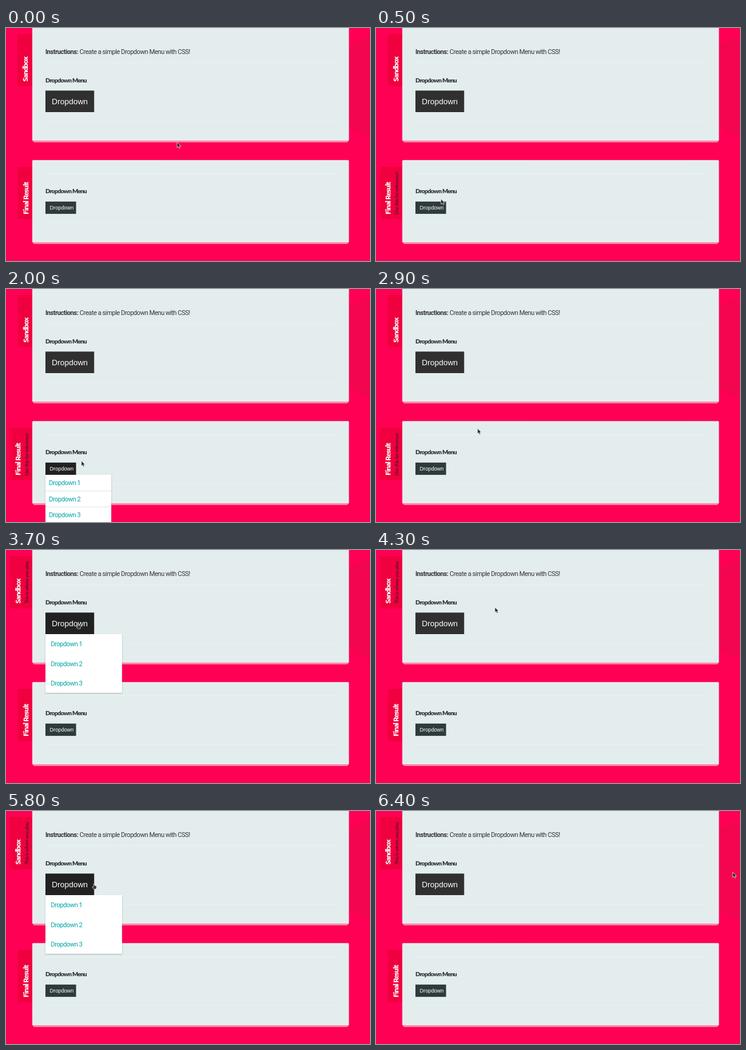
These frames come from a looping animation (600x385 px, 6.5 s). An HTML page:

```html
<!DOCTYPE html>
<html lang="en">
<head>
<meta charset="utf-8">
<title>Dropdown Menu</title>
<style>
  html, body { margin: 0; height: 100%; overflow: hidden; background: #ff0055; }
  svg { display: block; width: 600px; height: 385px; }
  .body { font: 10.6px Roboto, sans-serif; letter-spacing: -.48px; fill: #333; }
  .strong { font-weight: 700; }
  .link { fill: #00a5a8; }
  .head { font: 900 10.2px Lato, sans-serif; letter-spacing: -.8px; fill: #2f3335; }
  .title { font: 900 11.8px Lato, sans-serif; letter-spacing: -.7px; fill: #fff; }
  .note { font: 700 8px Lato, sans-serif; letter-spacing: -.38px; fill: #5a1232; }
  .label { font-family: "Liberation Sans", Arial, sans-serif; fill: #fff; }
  .menu { filter: drop-shadow(0 1px 1px rgba(0, 0, 0, .25)); }
</style>
</head>
<body>
<svg id="stage" viewBox="0 0 600 385"></svg>
<script>
const LOOP = 6500, STEP = 100, SLIDE = 13;

const text = (cls, x, y, str, extra = '') =>
  `<text class="${cls}" x="${x}" y="${y}" ${extra}>${str}</text>`;
const rect = (x, y, w, h, fill, extra = '') =>
  `<rect x="${x}" y="${y}" width="${w}" height="${h}" fill="${fill}" ${extra}/>`;

const tab = (id, y, title, note) => `<g id="${id}">
  ${rect(19.3, y, 50, 86.5, '#f0003e', 'rx="2"')}
  <g transform="translate(36.8 ${y + 78.5}) rotate(-90)">
    ${text('title', 0, 0, title)}${text('note', 0, SLIDE, note)}
  </g></g>`;

const panel = (y, bottom) => `
  <path d="M43.3 ${bottom - 1}h522v1l-3 3h-516l-3 -3z" fill="#f987a8"/>
  ${rect(43.3, y, 522, bottom - y, '#e4edee', 'rx="1.5"')}`;

const rule = y => rect(65, y, 480, 1, '#ebf1f1');

const button = b => rect(b.x, b.y, b.w, b.h, b.color, `id="${b.id}"`) +
  text('label', b.x + b.size * .81, b.y + b.h / 2 + b.size * .35, 'Dropdown', `font-size="${b.size}"`);

const menu = m => {
  const top = m.y + m.h;
  const item = i => (m.lines && i ? rect(m.x, top + i * m.row, m.menuW, 1, '#dde5e6') : '') +
    text('body link', m.x + m.indent, top + m.first + i * m.row, `Dropdown ${i + 1}`);
  return `<g id="${m.id}Menu" class="menu">
    ${rect(m.x, top, m.menuW, 3 * m.row, '#fff')}${[0, 1, 2].map(item).join('')}</g>`;
};

const buttons = [
  { id: 'big', x: 65, y: 103.4, w: 80.3, h: 35.6, size: 13, color: '#303030',
    menuW: 126.3, row: 32.3, indent: 8.8, first: 20.4 },
  { id: 'small', x: 65, y: 286.8, w: 50.5, h: 20.3, size: 8.7, color: '#2e3a3b',
    menuW: 108.5, row: 26.2, indent: 5.8, first: 17.3, lines: true }
];

document.getElementById('stage').innerHTML = `
  ${rect(0, 0, 600, 385, '#ff0055')}
  <circle cx="625" cy="97" r="88" fill="#f4054f"/>
  ${tab('sandbox', 10, 'Sandbox', 'This is where you play.')}
  ${tab('result', 229.5, 'Final Result', 'Use this for reference!')}
  ${panel(-5, 186)}${panel(218.3, 354)}
  ${[57, 154, 240.5, 321].map(rule).join('')}
  ${text('body strong', 65, 42.8, 'Instructions:')}
  ${text('body', 121.3, 42.8, 'Create a simple Dropdown Menu with CSS!')}
  ${text('head', 65, 90.3, 'Dropdown Menu')}
  ${text('head', 65, 273, 'Dropdown Menu')}
  ${buttons.map(button).join('')}${buttons.map(menu).join('')}
  <path id="arrow" d="M0 0V8.6L2 6.8L3.4 9.8L5 9.1L3.7 6.2H6.2z"
    fill="#222" stroke="#f4f4f4" stroke-width=".7"/>
  <path id="hand" d="M-.8 .6Q0 -.4 .8 .6V3.2L3.8 4Q4.5 4.6 4 6.6L3.4 9.2H-.8L-3 6Q-2.8 4.6 -1.4 5.6L-.8 6z"
    fill="#333" stroke="#dcdcdc" stroke-width=".7"/>`;

const el = id => document.getElementById(id);
const progress = (t, start, end) => Math.min(1, Math.max(0, (t - start) / (end - start)));
const ease = k => k * k * (3 - 2 * k);

// The pointer travels to each place in turn (start, end, x, y) ...
const origin = [282, 189];
const travels = [[0, 600, 93, 290], [2700, 3300, 119, 121], [5700, 6400, 588, 101]];
// ... and swings out and back around its way (start, end, dx, dy).
const swings = [
  [600, 900, -13, 3], [1100, 1600, 105, -32], [1900, 2200, 36, -7], [2700, 3300, 78, -18],
  [3400, 3600, 0, -28], [4000, 4700, 79, -27], [4700, 4900, 3.5, 4.5], [5000, 5600, 170, -44]
];

function pointerAt(t) {
  let [x, y] = origin;
  for (const [start, end, toX, toY] of travels) {
    const k = ease(progress(t, start, end));
    x += (toX - x) * k;
    y += (toY - y) * k;
  }
  for (const [start, end, dx, dy] of swings) {
    const k = Math.sin(Math.PI * progress(t, start, end));
    x += dx * k;
    y += dy * k;
  }
  return [x, y];
}

const inside = ([x, y], b) => x >= b.x && x <= b.x + b.w && y >= b.y && y <= b.y + b.h;
const slide = (t, start) => SLIDE * ease(progress(t, start, start + 300));
const show = (id, on) => el(id).setAttribute('visibility', on ? 'visible' : 'hidden');
const move = (id, x, y) => el(id).setAttribute('transform', `translate(${x} ${y})`);

function draw(t) {
  const pos = pointerAt(t), before = pointerAt(t - STEP);
  for (const b of buttons) {
    const hover = inside(before, b); // the page reacts one step after the pointer
    show(b.id + 'Menu', hover);
    el(b.id).setAttribute('fill', hover ? '#212121' : b.color);
  }
  move('sandbox', slide(t, -260) - SLIDE - slide(t, 3100), 0);
  move('result', slide(t, 3000) - slide(t, 200), 0);

  const hand = buttons.some(b => inside(pos, b));
  show('hand', hand);
  show('arrow', !hand);
  move(hand ? 'hand' : 'arrow', ...pos);
}

function tick() {
  draw(Math.floor(performance.now() % LOOP / STEP) * STEP);
  requestAnimationFrame(tick);
}
tick();
</script>
</body>
</html>
```
